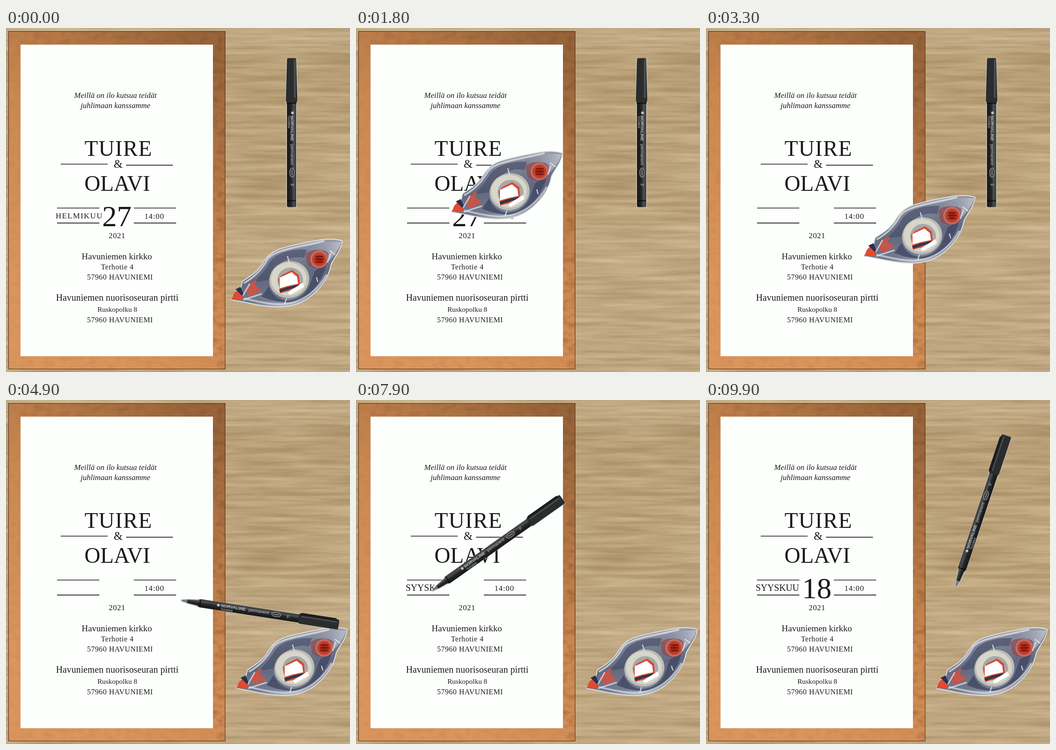
Recreate the animation shown at these times as an HTML page. Size 748 px wide and 748 px high, loop 10000 ms.

```html
<!DOCTYPE html>
<html lang="fi">
<head>
<meta charset="utf-8">
<title>Kutsukortti</title>
<style>
html, body { margin: 0; width: 100%; height: 100%; overflow: hidden; background: #bda57d; }
svg { position: absolute; left: 0; top: 0; width: 748px; height: 748px; }
text { font-family: "Liberation Serif", "Times New Roman", serif; fill: #191919; }
.mid { text-anchor: middle; }
.script { font-style: italic; font-size: 17px; }
.name { font-size: 48px; }
.place { font-size: 20px; }
.addr { font-size: 16px; letter-spacing: .6px; }
.big { font-size: 64px; }
.print text { font-family: "Liberation Sans", Arial, sans-serif; fill: #c4c5c6; }

.tape, .pen, .wipe, .reveal, .one, .eight, .capped, .open { animation: 10s linear infinite; }
.tape { animation-name: tape; will-change: transform; }
.pen { animation-name: pen; will-change: transform; }
.wipe { fill: #fdfffd; transform-box: fill-box; transform-origin: left; }
.month { animation-name: month; }
.upper { animation-name: upper; }
.lower { animation-name: lower; transform-origin: right; }
.reveal { animation-name: reveal; transform-origin: 107px 0; }
.one { animation-name: one; }
.eight { animation-name: eight; }
.capped { animation-name: capped; }
.open { animation-name: open; }

/* Fetch the tape, wipe right, back and right again, then put it down */
@keyframes tape {
  0% { transform: translate(0, 0); animation-timing-function: steps(11); }
  11% { transform: translate(-385px, -173px); animation-timing-function: steps(7); }
  18% { transform: translate(-282px, -191px); animation-timing-function: steps(4); }
  22% { transform: translate(-222px, -190px); animation-timing-function: steps(4); }
  26% { transform: translate(-283px, -176px); animation-timing-function: steps(4); }
  30% { transform: translate(-222px, -171px); animation-timing-function: steps(3); }
  33% { transform: translate(-146px, -95px); animation-timing-function: steps(6); }
  39%, 100% { transform: translate(11px, 36px); }
}
/* Fetch the pen, write up and down strokes, carry it back */
@keyframes pen {
  0%, 39% { transform: translate(621px, 228px) rotate(90deg); animation-timing-function: steps(5); }
  44% { transform: translate(645px, 400px) rotate(45deg); animation-timing-function: steps(5); }
  49% { transform: translate(552px, 462px) rotate(8.8deg); animation-timing-function: steps(6); }
  55% { transform: translate(317px, 331px) rotate(-35.2deg); animation-timing-function: steps(2); }
  57% { transform: translate(253px, 299px) rotate(-35.2deg); animation-timing-function: steps(3); }
  60% { transform: translate(253px, 317px) rotate(-35.2deg); animation-timing-function: steps(3); }
  63% { transform: translate(262px, 299px) rotate(-35.2deg); animation-timing-function: steps(3); }
  66% { transform: translate(272px, 317px) rotate(-35.2deg); animation-timing-function: steps(3); }
  69% { transform: translate(281px, 299px) rotate(-35.2deg); animation-timing-function: steps(3); }
  72% { transform: translate(289px, 317px) rotate(-35.2deg); animation-timing-function: steps(3); }
  75% { transform: translate(297px, 299px) rotate(-35.2deg); animation-timing-function: steps(4); }
  79% { transform: translate(307px, 315px) rotate(-35.2deg); animation-timing-function: steps(3); }
  82% { transform: translate(327px, 299px) rotate(-35.2deg); animation-timing-function: steps(2); }
  84% { transform: translate(342px, 315px) rotate(-35.2deg); animation-timing-function: steps(2); }
  86% { transform: translate(360px, 292px) rotate(-35.2deg); animation-timing-function: steps(2); }
  88% { transform: translate(366px, 328px) rotate(-35.2deg); animation-timing-function: steps(2); }
  90% { transform: translate(395px, 292px) rotate(-35.2deg); animation-timing-function: steps(2); }
  92% { transform: translate(398px, 327px) rotate(-35.2deg); animation-timing-function: steps(7); }
  99%, 100% { transform: translate(598.5px, 242px) rotate(-71.5deg); }
}
@keyframes month {
  0%, 11% { transform: scaleX(0); animation-timing-function: steps(7); }
  18%, 100% { transform: none; }
}
@keyframes upper {
  0%, 18% { transform: scaleX(0); animation-timing-function: steps(4); }
  22%, 100% { transform: none; }
}
@keyframes lower {
  0%, 22% { transform: scaleX(0); animation-timing-function: steps(4); }
  26%, 100% { transform: none; }
}
@keyframes reveal {
  0%, 57% { transform: scaleX(0); animation-timing-function: steps(3); }
  60% { transform: scaleX(.13); animation-timing-function: steps(19); }
  79% { transform: scaleX(.65); animation-timing-function: steps(5); }
  84%, 100% { transform: none; }
}
@keyframes one { 0%, 87.99% { opacity: 0; } 88%, 100% { opacity: 1; } }
@keyframes eight { 0%, 91.99% { opacity: 0; } 92%, 100% { opacity: 1; } }
@keyframes capped { 0%, 39.99% { opacity: 1; } 40%, 100% { opacity: 0; } }
@keyframes open { 0%, 39.99% { opacity: 0; } 40%, 100% { opacity: 1; } }
</style>
</head>
<body>
<!-- Table and card -->
<svg viewBox="0 0 748 748">
  <defs>
    <filter id="grain" x="0" y="0" width="1" height="1" color-interpolation-filters="sRGB">
      <feTurbulence type="fractalNoise" baseFrequency=".006 .1" numOctaves="4" seed="8"/>
      <feColorMatrix values=".2 0 0 0 .64  .22 0 0 0 .535  .22 0 0 0 .38  0 0 0 0 1"/>
    </filter>
    <filter id="foil" x="0" y="0" width="1" height="1" color-interpolation-filters="sRGB">
      <feTurbulence type="fractalNoise" baseFrequency=".05 .08" numOctaves="4" seed="3"/>
      <feColorMatrix values="0 0 0 0 .36  0 0 0 0 .2  0 0 0 0 .07  1.8 0 0 0 -.75"/>
    </filter>
    <linearGradient id="copper" gradientUnits="userSpaceOnUse" x1="20" y1="560" x2="470" y2="60">
      <stop offset="0" stop-color="#db955d"/>
      <stop offset=".45" stop-color="#cc8850"/>
      <stop offset="1" stop-color="#98643a"/>
    </linearGradient>
    <linearGradient id="light" x1="0" y1="0" x2="0" y2="1">
      <stop offset="0" stop-color="#fff" stop-opacity=".05"/>
      <stop offset=".07" stop-color="#fff" stop-opacity=".03"/>
      <stop offset=".075" stop-color="#6b4516" stop-opacity=".08"/>
      <stop offset=".2" stop-color="#6b4516" stop-opacity=".03"/>
      <stop offset=".56" stop-color="#6b4516" stop-opacity=".02"/>
      <stop offset=".565" stop-color="#fff" stop-opacity=".04"/>
      <stop offset="1" stop-color="#fff" stop-opacity=".03"/>
    </linearGradient>
    <clipPath id="written"><rect class="reveal" x="107" y="394" width="97" height="28"/></clipPath>
  </defs>
  <rect width="748" height="748" filter="url(#grain)"/>
  <rect width="748" height="748" fill="url(#light)"/>

  <rect x="5.5" y="7.5" width="471" height="734" fill="url(#copper)"/>
  <rect x="6" y="8" width="26" height="733" filter="url(#foil)" opacity=".08"/>
  <rect x="32" y="8" width="418" height="29" filter="url(#foil)" opacity=".2"/>
  <rect x="450" y="8" width="26" height="733" filter="url(#foil)" opacity=".35"/>
  <rect x="32" y="713" width="418" height="28" filter="url(#foil)" opacity=".1"/>
  <rect x="5.5" y="7.5" width="471" height="734" fill="none" stroke="#3a2a1c"/>
  <rect x="31.6" y="36.2" width="418.4" height="677.4" fill="#fdfffd"/>

  <text class="mid script" x="238" y="152">Meillä on ilo kutsua teidät</text>
  <text class="mid script" x="238" y="174">juhlimaan kanssamme</text>
  <text class="mid name" x="244.5" y="278" letter-spacing="1.2">TUIRE</text>
  <text class="mid" x="244" y="304" font-size="25">&amp;</text>
  <text class="mid name" x="242" y="354">OLAVI</text>
  <path d="M119 296H221M261 298.3H363M111 391.5H203M278 391.5H370M111 424.2H203M278 424.2H370" stroke="#191919" stroke-width="1.7"/>

  <text x="108" y="414" font-size="17" letter-spacing="1.5">HELMIKUU</text>
  <text class="big" x="209" y="431">27</text>
  <rect class="wipe month" x="107" y="396" width="104" height="24"/>
  <rect class="wipe upper" x="207" y="384" width="68" height="26"/>
  <rect class="wipe lower" x="207" y="409" width="68" height="25"/>
  <g clip-path="url(#written)"><text x="108" y="415" font-size="20">SYYSKUU</text></g>
  <text class="big one" x="209" y="431">1</text>
  <text class="big eight" x="241" y="431">8</text>
  <text class="mid" x="322.5" y="415" font-size="17" letter-spacing=".9">14:00</text>
  <text class="mid" x="241.5" y="457" font-size="17" letter-spacing=".6">2021</text>

  <text class="mid place" x="241" y="503" style="font-size:19.2px">Havuniemen kirkko</text>
  <text class="mid addr" x="242" y="525">Terhotie 4</text>
  <text class="mid addr" x="248" y="547">57960 HAVUNIEMI</text>
  <text class="mid place" x="242" y="593" letter-spacing=".1">Havuniemen nuorisoseuran pirtti</text>
  <text class="mid" x="242" y="617" font-size="15.5">Ruskopolku 8</text>
  <text class="mid addr" x="248" y="640">57960 HAVUNIEMI</text>
</svg>

<!-- Correction tape and marker -->
<svg viewBox="0 0 748 748">
  <defs>
    <linearGradient id="shell" x1=".35" y1="0" x2=".6" y2="1">
      <stop offset="0" stop-color="#c3c6cf"/>
      <stop offset=".2" stop-color="#858a9b"/>
      <stop offset=".55" stop-color="#626980"/>
      <stop offset=".85" stop-color="#747b8f"/>
      <stop offset="1" stop-color="#c2c6cf"/>
    </linearGradient>
    <linearGradient id="fin" x1="0" y1="0" x2="1" y2="0">
      <stop offset="0" stop-color="#8b90a2" stop-opacity=".2"/>
      <stop offset="1" stop-color="#bcbfca"/>
    </linearGradient>
    <radialGradient id="knob">
      <stop offset="0" stop-color="#8d1f12"/>
      <stop offset=".6" stop-color="#b93420"/>
      <stop offset="1" stop-color="#cf4a34"/>
    </radialGradient>
    <linearGradient id="barrel" x1="0" y1="0" x2="0" y2="1">
      <stop offset="0" stop-color="#3a3c3e"/>
      <stop offset=".3" stop-color="#4b4d4f"/>
      <stop offset=".5" stop-color="#252628"/>
      <stop offset="1" stop-color="#161718"/>
    </linearGradient>
    <filter id="soft"><feGaussianBlur stdDeviation=".6"/></filter>
    <g id="print" class="print">
      <circle cx="4" cy="-2" r="3" fill="#c4c5c6"/>
      <text x="10" y="1.5" font-size="9.5" font-weight="bold">NORVALINE</text>
      <text x="72" y="1.5" font-size="9.5">permanent</text>
      <text x="10" y="8" font-size="7" font-style="italic">Tussilina</text>
      <ellipse cx="134" cy="-1" rx="10" ry="5" fill="#333" stroke="#b9babb" stroke-width="1.2"/>
      <path d="M128-1H140" stroke="#8b8c8d" stroke-width="2"/>
      <text x="158" y="3" font-size="10">F</text>
    </g>
  </defs>

  <g class="tape">
    <path d="M731 463C715 458 696 458 676 462C648 467 616 473 591 482C576 488 567 498 560 509C548 530 531 540 514 551L510 567L503 569L490 591L500 593L517 596C545 602 574 608 603 606C634 604 655 592 674 573C695 552 703 534 707 514C716 495 729 483 731 463Z" fill="url(#shell)" stroke="#e0e1e4" stroke-width="2" stroke-linejoin="round"/>
    <path d="M574 508C590 487 625 480 654 482L648 500C610 492 585 518 570 548L545 552L528 562C548 545 563 528 574 508Z" fill="#454d68" opacity=".65"/>
    <path d="M556 584L571 562C580 584 596 592 612 592C640 590 658 574 664 548L672 528L697 512C690 545 668 578 640 592C612 602 580 594 556 584Z" fill="#3c4460" opacity=".75"/>
    <path d="M655 482C680 466 708 463 729 465C724 484 712 495 703 506L694 484Z" fill="url(#fin)"/>
    <path d="M517 555C544 540 558 521 568 504C583 480 645 476 692 463" fill="none" stroke="#e6e8ed" stroke-width="4" opacity=".7"/>
    <path d="M517 588C550 595 580 603 608 600C648 595 680 568 697 536" fill="none" stroke="#dfe2e8" stroke-width="4" opacity=".65"/>

    <!-- spool -->
    <ellipse cx="616" cy="547" rx="44" ry="40" transform="rotate(-18 616 547)" fill="#bdbdb5"/>
    <ellipse cx="615" cy="546" rx="39" ry="36" fill="#d8d6c9"/>
    <ellipse cx="618" cy="548" rx="28" ry="27" fill="#a6a8ab"/>
    <path d="M592 546L600 537L622 526L637 537L639 558L614 572L596 577Z" fill="#d84a31"/>
    <path d="M595 543L621 531L633 541L635 556L612 561L595 566Z" fill="#fff"/>
    <path d="M594 569L613 563L636 558L637 562L614 569L596 575Z" fill="#30364a"/>
    <path d="M612 575L645 554L648 563L618 580Z" fill="#fff"/>

    <!-- red knob -->
    <path d="M651 492C660 480 690 480 701 489L700 512C692 525 668 526 655 515Z" fill="#9c3f3c" opacity=".6"/>
    <circle cx="681" cy="503" r="19" fill="#c08a88" opacity=".7"/>
    <circle cx="681" cy="503" r="16" fill="url(#knob)" stroke="#d65a42"/>
    <path d="M673 497H690M672 503H691M673 509H690" stroke="#70150e" stroke-width="2.5"/>

    <!-- nozzle -->
    <path d="M490 591L496 577L503 570L511 576L517 586L508 592L498 590Z" fill="#e04a32"/>
    <path d="M499 568L510 563L517 580L513 582Z" fill="#273052"/>
    <path d="M521 571L527 558L540 549L546 549L541 560L552 567L554 575L545 574L536 583L526 580Z" fill="#cf5444" opacity=".9"/>
    <path d="M515 582L530 556M516 591L556 578" stroke="#dcdce2" stroke-width="3" opacity=".8"/>
    <path d="M616 510L612 496M675 542L678 552M610 588L606 600M699 510L706 490M704 484L716 493" stroke="#e9ebef" stroke-width="2.5" opacity=".8"/>
  </g>

  <g class="pen">
    <g class="capped" transform="translate(-162.5 0)" filter="url(#soft)">
      <path d="M2-10L97-12V-10H324V10H97V12L2 10Z" fill="none" stroke="#d2cdc4" stroke-width="3" opacity=".7"/>
      <rect x="92" y="-10" width="232" height="20" rx="3" fill="url(#barrel)"/>
      <path d="M3-10Q0-10 0-7V7Q0 10 3 10L92 12.5Q98 12 98 6V-6Q98-12 92-12.5Z" fill="#2a2c2e"/>
      <path d="M3-7H86" stroke="#4b4e50" stroke-width="4"/>
      <path d="M98-11V11M310-9V9" stroke="#000" stroke-width="1.5"/>
      <use href="#print" transform="translate(115 0)"/>
    </g>
    <g class="open" transform="translate(-173.5 0)" filter="url(#soft)">
      <path d="M1-1L14-4L40-8L255-9L258-11H346V11H258L255 9L40 8L14 4L1 2Z" fill="none" stroke="#cbc8c2" stroke-width="2.5" opacity=".65"/>
      <path d="M0 0L4-2L16-4V4L4 2Z" fill="#77797b"/>
      <path d="M14-4L36-6L42-9H265V9H42L36 6L14 4Z" fill="url(#barrel)"/>
      <path d="M42-8V8" stroke="#000" stroke-width="1.5"/>
      <path d="M258-9L262-11H344Q347-11 347-8V9Q347 11 344 11H262L258 9Z" fill="#2a2c2e"/>
      <path d="M258-9L264-13H340L343-8H262Z" fill="#1b1c1d"/>
      <path d="M264-5H343" stroke="#54575a" stroke-width="2"/>
      <use href="#print" transform="translate(78 0) scale(.98 .95)"/>
    </g>
  </g>
</svg>
</body>
</html>
```
